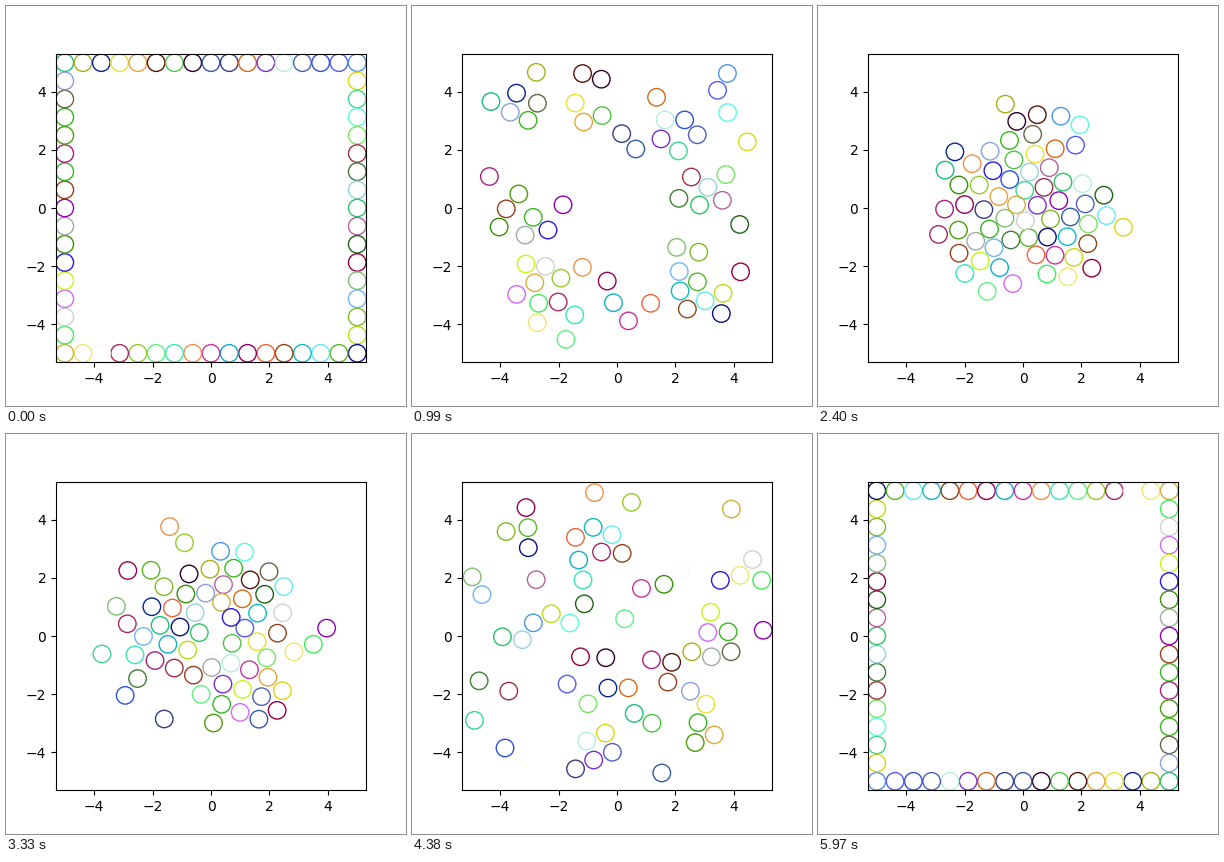
A matplotlib script that plays this animation: 400 px wide and 400 px high, repeating every 6000 ms.

```python
import matplotlib.pyplot as plt
import numpy as np
from matplotlib.animation import FuncAnimation
from matplotlib.patches import Circle

FRAMES, INTERVAL = 200, 30
HALF, RADIUS, LIMIT = 5.0, 0.3, 5.3
SCATTER = 3.0  # how far a disc may stray from its straight crossing

# Clockwise from the top left corner, one group per side.
COLORS = """
#1cbe78 #aaaf14 #0a238c #e6e132 #e6a53c #55140a #50c346 #2d0028
#325aa5 #373c82 #d76914 #7d2dcd #b4f0e1 #505fb9 #2d50e1 #555af0

#4b96e6 #dcd714 #3cd78c #5afae1 #78e664 #9b3241 #417d37 #96d2dc
#2dc364 #b4649b #1e6414 #96003c #82be73 #73b4f0 #82b928 #bedc14

#0a0f7d #55b923 #64ebf0 #0abec3 #8c4619 #eb643c #91005a #0fafc8
#c832a0 #f0914b #37e6b9 #5ff082 #96cd28 #a52869 #faf8f8 #f0e673

#d2af3c #41eb5f #d0d2d2 #d269f5 #c3fa14 #2819e1 #379105 #a0aaa5
#9100b4 #96411e #32b91e #aa1e82 #509b0a #37b91e #696446 #8ca0dc
""".split()
COUNT = len(COLORS)


def square_ring():
    """Evenly spaced points along the square, as complex numbers."""
    side, i = np.divmod(np.arange(COUNT), COUNT // 4)
    top = -HALF + 2 * HALF * i / (COUNT // 4) + 1j * HALF
    return top * (-1j) ** side


def progress(t):
    return t + 0.6 * t**2 * (1 - t)


def keep_inside(z):
    return np.clip(z.real, -HALF, HALF) + 1j * np.clip(z.imag, -HALF, HALF)


def push_apart(z, gap):
    """Shift that moves each disc away from those closer than gap."""
    diff = z[:, None] - z
    dist = np.abs(diff) + 1e-9
    overlap = np.clip(gap - dist, 0, None)
    return (0.4 * overlap * diff / dist).sum(axis=1)


def cross_over():
    """Each disc heads for the opposite spot, dodging the others."""
    rng = np.random.default_rng(7)
    stray = SCATTER * np.sqrt(rng.random(COUNT)) * np.exp(
        2j * np.pi * rng.random(COUNT))
    home = square_ring()
    dodge = np.zeros(COUNT, complex)
    track = []
    for t in np.linspace(0, 1, FRAMES):
        swell = np.sin(np.pi * t)
        guide = keep_inside(home * (1 - 2 * progress(t)) + stray * swell)
        dodge *= 0.92
        for _ in range(6):
            dodge += push_apart(guide + dodge, 0.62 + 0.1 * swell)
        fade = min(1, 8 * swell)
        track.append(keep_inside(guide + dodge * fade))
    return track


track = cross_over()

fig, ax = plt.subplots(figsize=(4, 4), dpi=100)
ax.set_xlim(-LIMIT, LIMIT)
ax.set_ylim(-LIMIT, LIMIT)
circles = [ax.add_patch(Circle((0, 0), RADIUS, fill=False, edgecolor=c))
           for c in COLORS]


def update(frame):
    for circle, z in zip(circles, track[frame]):
        circle.center = z.real, z.imag
    return circles


anim = FuncAnimation(fig, update, frames=FRAMES, interval=INTERVAL,
                     repeat=True, repeat_delay=0)
plt.show()
```
